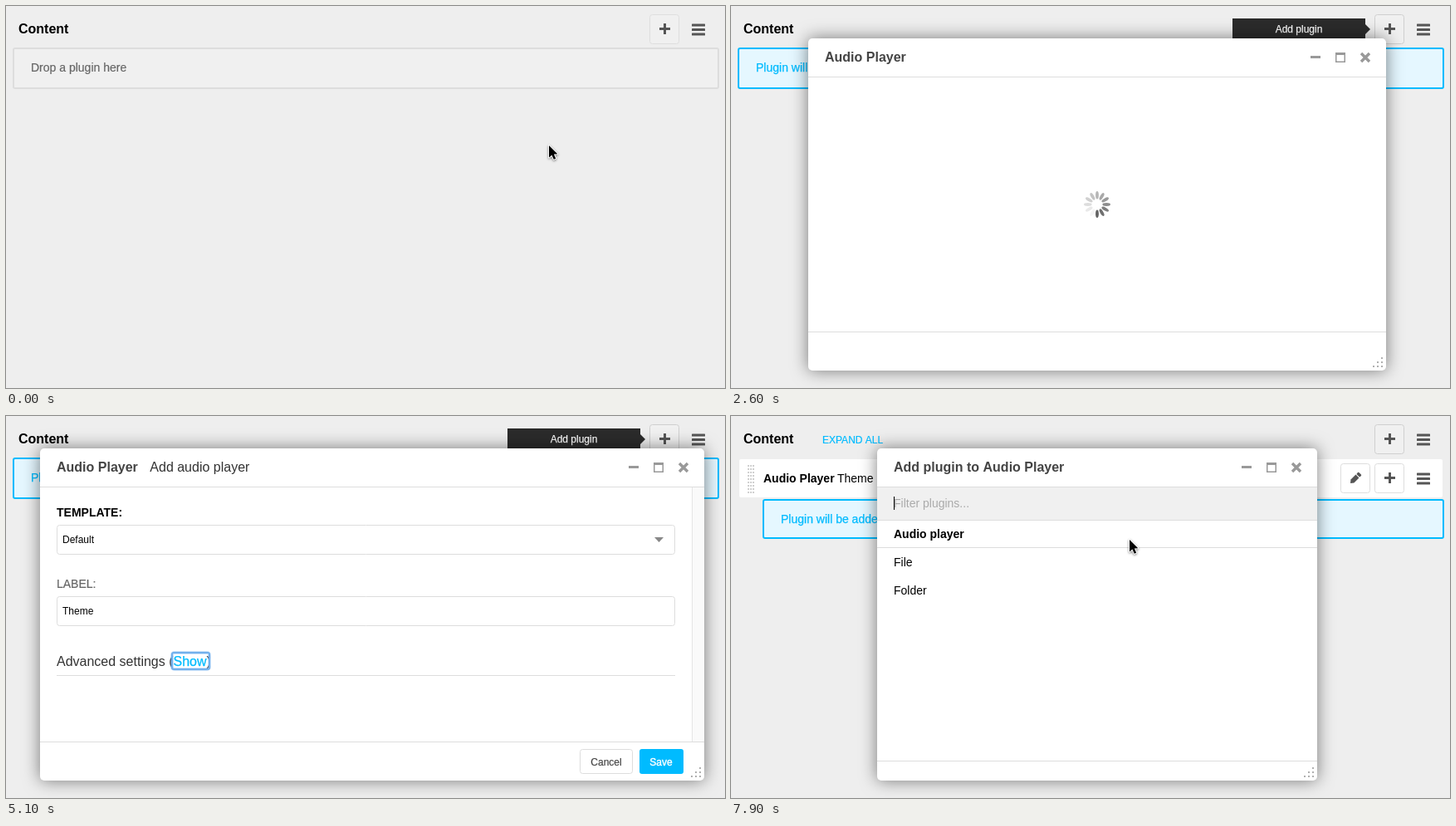
Write an HTML page with a canvas that moves like this. It is 866 px wide and 460 px high and loops after 8 s.

```html
<!DOCTYPE html>
<html lang="en">
<head>
<meta charset="utf-8">
<title>Adding a plugin</title>
<style>
  html, body { margin: 0; width: 100%; height: 100%; overflow: hidden; background: #eee; }
  canvas { display: block; }
</style>
</head>
<body>
<canvas id="stage" width="866" height="460"></canvas>
<script>
const ctx = document.getElementById('stage').getContext('2d');
const LOOP = 8000, STEP = 100;
const BLUE = '#00bbff', LINE = '#dddddd', ICON = '#555555', MUTED = '#999999';
const PLUGINS = ['Alias', 'Audio Player', 'File', 'Folder', 'Image', 'Link', 'Style', 'Text'];

const clamp = v => Math.max(0, Math.min(1, v));
const progress = (t, from, to) => clamp((t - from) / (to - from));
const mix = (a, b, p) => a + (b - a) * p;
const ease = p => p * p * (3 - 2 * p);
const typed = (word, t, start) =>
  word.slice(0, Math.max(0, Math.floor((t - start) / STEP) + 1));

function rect(x, y, w, h, color) {
  ctx.fillStyle = color;
  ctx.fillRect(x, y, w, h);
}

function box(x, y, w, h, { fill, stroke, radius = 3, width = 1 }) {
  const inset = stroke ? width / 2 : 0;
  ctx.beginPath();
  ctx.roundRect(x + inset, y + inset, w - inset * 2, h - inset * 2, radius);
  if (fill) { ctx.fillStyle = fill; ctx.fill(); }
  if (stroke) { ctx.strokeStyle = stroke; ctx.lineWidth = width; ctx.stroke(); }
}

function poly(points, color) {
  ctx.beginPath();
  points.forEach(([x, y]) => ctx.lineTo(x, y));
  ctx.closePath();
  ctx.fillStyle = color;
  ctx.fill();
}

// Draws text and returns the x where it ends.
function text(str, x, y, { size = 14, color = '#000', bold = false, align = 'left', heavy = 0 } = {}) {
  ctx.font = `${bold ? 'bold ' : ''}${size}px "Liberation Sans", Arial, sans-serif`;
  ctx.textAlign = align;
  ctx.fillStyle = color;
  ctx.fillText(str, x, y);
  if (heavy) {
    ctx.strokeStyle = color;
    ctx.lineWidth = heavy;
    ctx.strokeText(str, x, y);
  }
  return x + ctx.measureText(str).width;
}

// Page

function plusButton(y, fill, border) {
  box(775, y, 36, 36, { fill, stroke: border });
  rect(787, y + 16, 13, 3, ICON);
  rect(792, y + 11, 3, 13, ICON);
}

function menuIcon(y) {
  for (let i = 0; i < 3; i++) box(826, y + i * 5.5, 16, 3, { fill: ICON, radius: 0.6 });
}

function pencil(x, y) {
  ctx.save();
  ctx.translate(x, y);
  ctx.rotate(-Math.PI / 4);
  poly([[-8.5, 0], [-5, -2.8], [3.5, -2.8], [3.5, 2.8], [-5, 2.8]], ICON);
  box(4.5, -2.8, 3.5, 5.6, { fill: ICON, radius: 1 });
  ctx.restore();
}

function tooltip(y) {
  rect(604, y, 160, 26, '#2b2b2b');
  poly([[764, y + 7], [770, y + 13], [764, y + 19]], '#2b2b2b');
  text('Add plugin', 684, y + 17, { size: 12, color: '#fff', align: 'center', heavy: 0.25 });
}

function target(x, y, w, h) {
  box(x, y, w, h, { fill: '#e5f7ff', stroke: BLUE, width: 2, radius: 2 });
  text('Plugin will be added here', x + 22, y + 29, { color: BLUE, heavy: 0.25 });
}

function pluginRow() {
  box(10, 52, 847, 46, { fill: '#fff', radius: 2 });
  for (let i = 0; i < 27; i++) {
    rect(20 + (i % 3) * 3, 59 + Math.floor(i / 3) * 4, 2, 2, '#d0d0d0');
  }
  text('Audio Player', 39, 80, { bold: true });
  text('Theme', 128, 80);
  box(734, 57, 36, 36, { fill: '#fff', stroke: LINE });
  pencil(752, 75);
  plusButton(57, '#fff', LINE);
  menuIcon(68.5);
}

function page(t) {
  rect(0, 0, 866, 460, '#eeeeee');
  text('Content', 15, 33, { size: 16, bold: true });
  plusButton(10, '#f0f0f0', t < 500 ? '#dedede' : '#cfcfcf');
  menuIcon(21.5);
  if (t >= 6500) {
    text('EXPAND ALL', 110, 33, { size: 12, color: BLUE, heavy: 0.2 });
    pluginRow();
    if (t >= 7500) target(38, 100, 821, 48);
  } else if (t >= 700) {
    target(8, 50, 851, 50);
  } else {
    box(8, 50, 851, 50, { fill: '#f0f0f0', stroke: LINE, width: 2, radius: 2 });
    text('Drop a plugin here', 30, 79, { color: '#666', heavy: 0.2 });
  }
}

// Dialogs

function windowIcons(right) {
  rect(right - 91, 60, 12, 3, MUTED);
  ctx.strokeStyle = MUTED;
  ctx.lineWidth = 1.5;
  ctx.strokeRect(right - 60.25, 56.75, 10.5, 10.5);
  rect(right - 61, 56, 12, 3, MUTED);
  ctx.lineWidth = 3.4;
  ctx.beginPath();
  ctx.moveTo(right - 30, 57); ctx.lineTo(right - 20, 67);
  ctx.moveTo(right - 20, 57); ctx.lineTo(right - 30, 67);
  ctx.stroke();
}

function dialog(left, right, footer, title) {
  ctx.save();
  ctx.shadowColor = `rgba(0,0,0,${0.5 * ctx.globalAlpha})`;
  ctx.shadowBlur = 20;
  box(left, 39, right - left, 400, { fill: '#fff', radius: 5 });
  ctx.restore();
  const end = text(title, left + 20, 67, { size: 16, bold: true, color: '#444' });
  windowIcons(right);
  rect(left, 85, right - left, 1, LINE);
  rect(left, footer, right - left, 1, LINE);
  for (let row = 0; row < 3; row++) {
    for (let col = 2 - row; col < 3; col++) {
      rect(right - 16 + col * 5, 423 + row * 5, 2, 2, '#b0b0b0');
    }
  }
  return end;
}

function caret(x, y) {
  rect(Math.round(x), y, 1, 16, '#000');
}

function picker(title, query, group, items) {
  dialog(176, 706, 415, title);
  rect(176, 86, 530, 39, '#f0f0f0');
  if (query) {
    caret(text(query, 196, 110, { color: '#222' }), 97);
  } else {
    text('Filter plugins...', 196, 110, { color: '#aaa' });
    caret(196, 97);
  }
  rect(176, 125, 530, 1, LINE);
  text(group, 196, 147, { bold: true });
  rect(176, 158, 530, 1, LINE);
  ctx.save();
  ctx.beginPath();
  ctx.rect(176, 159, 530, 256);
  ctx.clip();
  items.forEach((item, i) => text(item, 196, 181 + i * 34));
  ctx.restore();
}

function spinner(t) {
  const head = 6 + Math.round((t - 2600) / STEP);
  for (let i = 0; i < 12; i++) {
    const behind = (((head - i) % 12) + 12) % 12;
    ctx.save();
    ctx.translate(441, 239);
    ctx.rotate(i * Math.PI / 6);
    ctx.beginPath();
    ctx.ellipse(0, -11.2, 1.9, 4.8, 0, 0, Math.PI * 2);
    ctx.fillStyle = `rgba(70,70,70,${0.85 * Math.pow(1 - behind / 12, 1.1)})`;
    ctx.fill();
    ctx.restore();
  }
}

function formFields(t) {
  rect(826, 86, 15, 306, '#fafafa');
  rect(826, 86, 1, 306, '#e5e5e5');
  text('TEMPLATE:', 61, 121, { bold: true });
  box(61, 131, 745, 36, { fill: '#fff', stroke: LINE });
  text('Default', 68, 153, { size: 12 });
  poly([[781, 146], [792, 146], [786.5, 152]], '#888');
  text('LABEL:', 61, 207, { color: '#666', heavy: 0.2 });
  box(61, 217, 745, 36, { fill: '#fff', stroke: LINE });
  const end = text(typed('Theme', t, 4200), 68, 239, { size: 12 });
  const tabbed = t >= 4900;
  if (t >= 4100 && !tabbed) caret(end, 227);

  let x = text('Advanced settings (', 61, 301, { size: 16, color: '#333' });
  x = text('Show', x, 301, { size: 16, color: BLUE, heavy: 0.25 });
  text(')', x, 301, { size: 16, color: '#333' });
  rect(61, 312, 745, 1, LINE);
  if (tabbed) {
    box(198, 283, 49, 24, { stroke: 'rgba(100,170,240,.35)', width: 4, radius: 3 });
    box(199, 284, 47, 22, { stroke: '#72b0ec', width: 2, radius: 2 });
  }
}

function formButtons() {
  box(691, 401, 64, 30, { fill: '#fff', stroke: LINE });
  text('Cancel', 723, 421, { size: 12, color: '#444', align: 'center', heavy: 0.2 });
  box(763, 401, 53, 30, { fill: BLUE });
  text('Save', 789, 421, { size: 12, color: '#fff', align: 'center', heavy: 0.4 });
}

function playerForm(t) {
  const grow = 1 - Math.pow(1 - progress(t, 2500, 2700), 1.38);
  const spread = Math.round(135 * grow);
  const end = dialog(176 - spread, 706 + spread, 392, 'Audio Player');
  if (t < 2800) return spinner(t);
  text('Add audio player', end + 14.5, 67, { size: 16, color: '#333' });
  formButtons();
  if (t < 5700) formFields(t);
  else spinner(t);
}

function fadeIn(t, start, draw) {
  ctx.save();
  ctx.globalAlpha = progress(t, start - STEP, start + STEP);
  draw();
  ctx.restore();
}

// Pointer

function pointer(x, y) {
  const shape = [[0, 0], [0, 14.5], [3.4, 11.4], [5.8, 16.8], [8.2, 15.7], [5.9, 10.5], [10.3, 10.3]];
  ctx.save();
  ctx.translate(x, y);
  ctx.shadowColor = 'rgba(0,0,0,.4)';
  ctx.shadowBlur = 3;
  ctx.shadowOffsetY = 1;
  ctx.lineJoin = 'round';
  ctx.lineWidth = 2;
  ctx.strokeStyle = '#fff';
  poly(shape, '#000');
  ctx.stroke();
  ctx.restore();
  ctx.save();
  ctx.translate(x, y);
  poly(shape, '#000');
  ctx.restore();
}

function movePointer(t) {
  if (t < 1300) {
    const p = ease(progress(t, 0, 500));
    pointer(mix(654, 793, p), mix(168, 29, p));
  } else if (t >= 6600) {
    const down = ease(progress(t, 6700, 7100));
    const across = ease(progress(t, 7500, 7900));
    pointer(mix(793, 480, across), mix(mix(29, 76, down), 149, across));
  }
}

function draw(t) {
  if (t >= 6100 && t < 6500) return rect(0, 0, 866, 460, '#fefefe');
  page(t);
  if ((t >= 500 && t < 700) || (t >= 2200 && t < 6100) || (t >= 6600 && t < 6900)) tooltip(15);
  if (t >= 7000 && t < 7500) tooltip(62);

  if (t >= 800 && t < 2300) {
    const query = t < 1500 ? typed('a', t, 1300) : typed('audio', t, 1400);
    const items = t < 1600 ? PLUGINS : ['Audio Player'];
    fadeIn(t, 800, () => picker('Add plugin to placeholder "Content"', query, 'Generic', items));
  } else if (t >= 2300 && t < 6000) {
    playerForm(t);
  } else if (t >= 7600) {
    fadeIn(t, 7600, () => picker('Add plugin to Audio Player', '', 'Audio player', ['File', 'Folder']));
  }
  movePointer(t);
}

function tick(now) {
  draw(Math.floor((now % LOOP) / STEP) * STEP);
  requestAnimationFrame(tick);
}
tick(performance.now());
</script>
</body>
</html>
```
